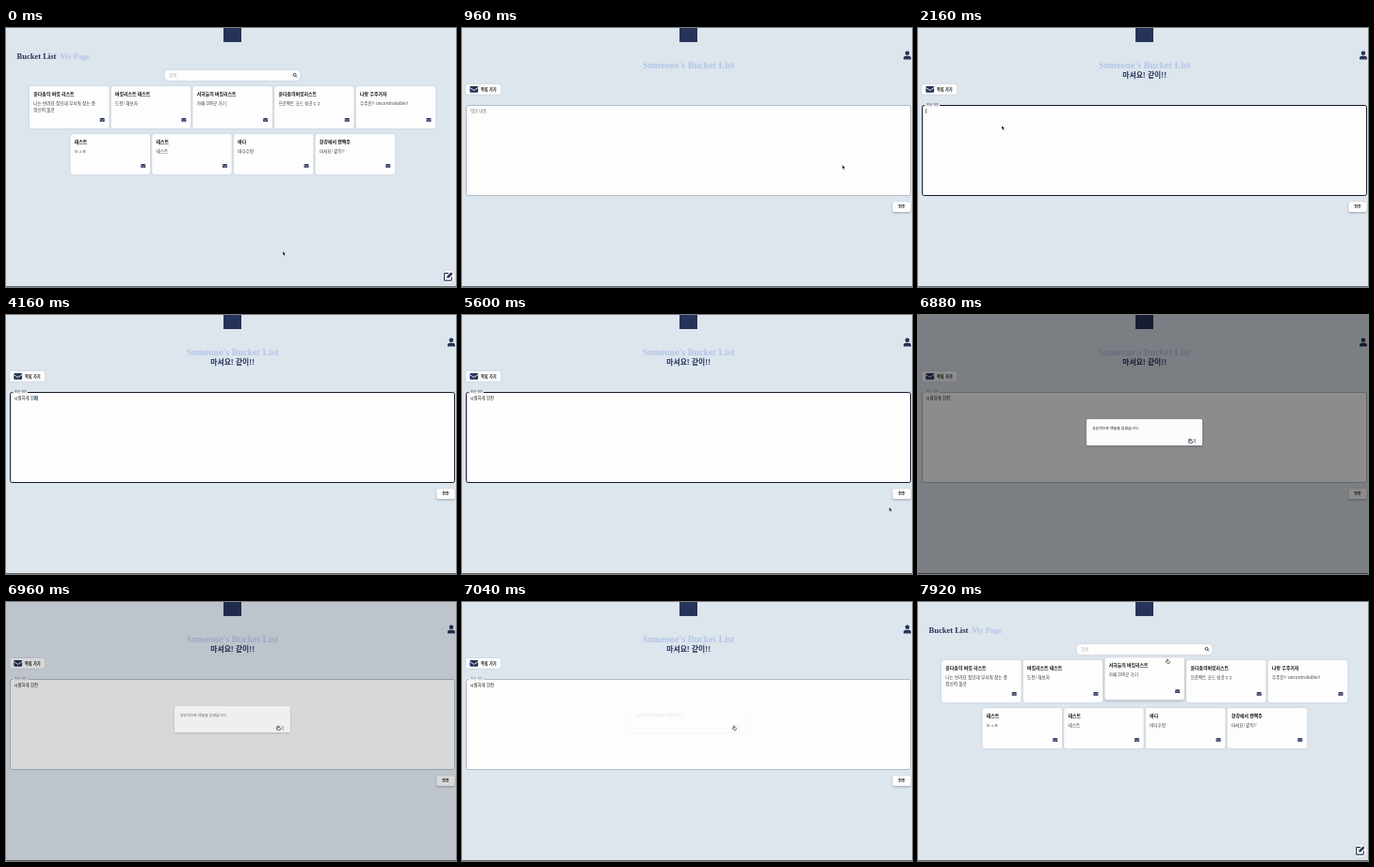
Write an HTML page that moves like this. It is 478 px wide and 276 px high and loops after 8 s.

```html
<!DOCTYPE html>
<html lang="ko">
<head>
<meta charset="utf-8">
<title>Bucket List</title>
<style>
html, body { margin: 0; width: 100%; height: 100%; overflow: hidden; background: #dde5ed; }
svg { display: block; width: 100%; height: 100%; }
text { font-family: "Noto Sans CJK KR", "Noto Sans CJK", "Noto Sans", sans-serif; white-space: pre; }
.serif { font-family: "Liberation Serif", serif; font-weight: 700; }
.bold { font-weight: 700; }
.soft { filter: drop-shadow(0 .5px .9px rgba(60, 80, 110, .15)); }
.raised { filter: drop-shadow(0 1px 1px rgba(30, 40, 60, .35)); }
</style>
</head>
<body>
<svg id="stage" viewBox="0 0 478 276"></svg>
<script>
const LOOP = 8000, NAVY = '#27345a', PALE = '#b3c5e8';
const stage = document.getElementById('stage');
const $ = id => document.getElementById(id);

const text = (x, y, size, str, fill = '#111', extra = '') =>
  `<text x="${x}" y="${y}" font-size="${size}" fill="${fill}" ${extra}>${str}</text>`;
const box = (x, y, w, h, r, fill, extra = '') =>
  `<rect x="${x}" y="${y}" width="${w}" height="${h}" rx="${r}" fill="${fill}" ${extra}/>`;
const mail = (x, y, w) => {
  const h = w * .76;
  return box(x, y, w, h, w * .12, NAVY) +
    `<path d="M${x} ${y + h * .24}l${w / 2} ${h * .42}l${w / 2} ${-h * .42}" fill="none" stroke="#fdfdfd" stroke-width="${w * .1}"/>`;
};

// title, description lines, hover interval
const cards = [
  ['윤다솜의 버킷 리스트', ['나는 반려묘 집인데 무서워 잡는 중', '정신력 풀로']],
  ['버킷리스트 테스트', ['도전! 해보자']],
  ['서하늘의 버킷리스트', ['카페 100곳 가기'], [7580, LOOP]],
  ['윤다솜의버킷리스트', ['프로젝트 코드 성공ㅎㅎ']],
  ['나랑 우주가자', ['우주인!! uncontrollable!!']],
  ['테스트', ['ㅌㅅㅌ']],
  ['테스트', ['테스트']],
  ['바다', ['바다수영'], [7150, 7480]],
  ['한강에서 캔맥주', ['마셔요! 같이!!'], [500, 960]]
];

function card([title, lines], i) {
  const low = i > 4, h = low ? 43 : 45, y = low ? 113 : 62;
  const x = low ? 68.5 + (i - 5) * 86.7 : 25 + i * 86.7;
  return `<g id="card${i}">` +
    box(x, y, 84.5, h, 3, '#fdfdfd') +
    text(x + 4.3, y + 10, 4.9, title, '#111', 'class="bold"') +
    lines.map((s, n) => text(x + 4.3, y + 19.7 + n * 7.6, 4.6, s, '#3c3c3c')).join('') +
    mail(x + 74.7, y + h - 11, 5) + '</g>';
}

const listPage = `<g id="list">
  ${text(11.5, 32.8, 8.5, 'Bucket List', NAVY, 'class="serif"')}
  ${text(57.3, 32.8, 8.5, 'My Page', PALE, 'class="serif"')}
  ${box(168.5, 45, 144, 11, 4.5, '#fdfdfd', 'class="soft"')}
  ${text(173, 52.2, 4.4, '검색', '#b0b0b0')}
  <g fill="none" stroke="#222" stroke-width=".8"><circle cx="306.6" cy="49.9" r="1.5"/><path d="M307.8 51.1l1.4 1.4"/></g>
  ${cards.map(card).join('')}
  <circle cx="470" cy="265" r="6.6" fill="#fdfdfd" class="soft"/>
  <g transform="translate(470 264.7) scale(1.12) translate(-470.2 -264.8)">
    <path d="M470.3 261.8h-3.3a.8.8 0 0 0-.8.8v5.4a.8.8 0 0 0 .8.8h5.4a.8.8 0 0 0 .8-.8v-2.8" fill="none" stroke="${NAVY}" stroke-width="1"/>
    <path d="M468.6 266.5l.4-2 3.7-3.7 1.6 1.6-3.7 3.7z" fill="${NAVY}"/>
  </g>
</g>`;

const formPage = `<g id="form">
  ${text(240.5, 42.8, 10.1, "Someone's Bucket List", PALE, 'class="serif" text-anchor="middle"')}
  ${text(240.7, 53.1, 7.8, '마셔요! 같이!!', NAVY, 'id="wish" class="bold" text-anchor="middle"')}
  <circle cx="473" cy="26.7" r="2.3" fill="${NAVY}"/>
  <path d="M469 33.4v-1a2.6 2.6 0 0 1 2.6-2.6h2.8a2.6 2.6 0 0 1 2.6 2.6v1z" fill="${NAVY}"/>
  ${box(4.3, 60, 36.7, 10.8, 1.8, '#fdfdfd', 'class="soft"')}
  ${mail(8.3, 62, 8.8)}
  ${text(20, 66.8, 4.2, '목록 가기', '#111', 'class="bold"')}
  ${box(4.5, 82.5, 472, 96, 2, '#fdfdfd', 'id="field"')}
  ${box(7.5, 81.4, 15.5, 2.2, 0, '#fdfdfd', 'id="notch"')}
  <text id="label" fill="#555">댓글 내용</text>
  <rect id="mark" y="86" height="5.2" fill="#a9cbe4"/>
  <text id="typed" x="8.5" y="90" font-size="4.4" fill="#111"></text>
  <rect id="caret" y="86" width=".6" height="5" fill="#111"/>
  ${box(457.3, 185.2, 19.4, 10.8, 1.8, '#fdfdfd', 'class="raised"')}
  ${text(467, 192.1, 4, '전송', '#111', 'class="bold" text-anchor="middle"')}
</g>`;

const dialog = `<rect id="shade" width="478" height="276" fill="#000"/>
<g id="dialog">
  ${box(179, 111, 123, 28, 1.5, '#fdfdfd', 'class="raised"')}
  ${text(185, 121.5, 3.9, '성공적으로 댓글을 남겼습니다.', '#111')}
  ${text(286.8, 135.8, 4.8, '닫기', NAVY)}
</g>`;

const pointer = `<g id="pointer" stroke="#fff" stroke-width=".4">
  <path id="arrow" d="M0 0v4.3l1-.9.8 1.8.8-.4-.8-1.7h1.4z" fill="#000"/>
  <path id="hand" transform="scale(.85)" d="M-.6.4a.6.6 0 0 1 1.2 0v1.7l1.8.4q.6.2.5.8l-.4 1.9h-2.9l-1.9-2.2q.4-.8 1.7.1z" fill="#fff" stroke="#111" stroke-width=".6"/>
</g>`;

stage.innerHTML = box(0, 0, 478, 276, 0, '#dde5ed') + box(231, -4, 19, 19, 0, NAVY) +
  listPage + formPage + box(0, 275, 478, 1, 0, '#666b70') + dialog + pointer;

const ease = (t, from, len) => {
  const x = Math.min(1, Math.max(0, (t - from) / len));
  return x * x * (3 - 2 * x);
};
const within = (t, a, b) => t >= a && t < b;
const show = (id, on) => $(id).setAttribute('visibility', on ? 'visible' : 'hidden');
const set = (id, attrs) => {
  for (const k in attrs) $(id).setAttribute(k, attrs[k]);
};

// time, x, y
const path = [
  [0, 294, 238], [80, 294, 238], [480, 372, 166], [760, 404, 146], [1240, 404, 146],
  [1520, 108, 100], [1680, 89, 104], [4920, 89, 104], [5280, 300, 200], [5480, 440, 221],
  [5700, 464, 193], [5900, 464, 193], [6320, 289, 132], [7240, 289, 132],
  [7540, 270, 110], [7880, 265, 61], [8000, 265, 61]
];
function pointerAt(t) {
  const i = path.findIndex(p => p[0] > t);
  const [t0, x0, y0] = path[i - 1], [t1, x1, y1] = path[i];
  const k = ease(t, t0, t1 - t0);
  return [x0 + (x1 - x0) * k, y0 + (y1 - y0) * k];
}

// Hangul composition: time, finished text, syllable in progress
const keys = [
  [2560, '', 'ㅅ'], [2680, '', '시'],
  [2880, '시', 'ㅇ'], [2960, '시', '우'], [3040, '시', '워'], [3120, '시', '원'],
  [3280, '시원', 'ㅎ'], [3360, '시원', '하'],
  [3520, '시원하', 'ㄱ'], [3680, '시원하', '게'],
  [3840, '시원하게 ', ''], [3920, '시원하게 ', 'ㅎ'], [4000, '시원하게 ', '하'], [4080, '시원하게 ', '한'],
  [4160, '시원하게 한', '자'], [4480, '시원하게 한', '잔'], [4640, '시원하게 한잔', '']
];

function drawForm(t) {
  const focus = within(t, 1720, 5700), up = ease(t, 1720, 200);
  show('wish', t >= 1040);
  set('field', { stroke: focus ? '#141a2b' : '#8798a8', 'stroke-width': focus ? 1 : .6 });
  set('notch', { opacity: up });
  set('label', { x: 9, y: 90 - 6.7 * up, 'font-size': 4.4 - 1.1 * up, fill: focus ? NAVY : '#777' });

  const [, done, part] = keys.filter(k => k[0] <= t).pop() || [0, '', ''];
  const typed = $('typed');
  typed.textContent = done + part;
  const end = done + part ? 8.5 + typed.getComputedTextLength() : 8.5;
  const wide = part ? 4.05 : 0;
  set('mark', { x: end - wide, width: wide });
  set('caret', { x: end });
  const typing = within(t, 2560, 4700);
  show('caret', focus && !part && (typing || (t - 1720) % 1060 < 530));
}

function draw(t) {
  const onForm = within(t, 960, 7140);
  $('list').style.display = onForm ? 'none' : '';
  $('form').style.display = onForm ? '' : 'none';
  if (onForm) drawForm(t);

  cards.forEach(([, , hover], i) => {
    const k = hover ? ease(t, hover[0], 220) - ease(t, hover[1], 220) : 0;
    const el = $('card' + i);
    el.setAttribute('transform', `translate(0 ${-2.7 * k})`);
    el.style.filter = `drop-shadow(0 ${.5 + .7 * k}px ${.9 + .5 * k}px rgba(50,65,95,${.15 + .2 * k}))`;
  });

  const enter = ease(t, 5765, 225);
  set('shade', { opacity: .5 * enter * (1 - ease(t, 6845, 180)) });
  set('dialog', { opacity: enter * (1 - ease(t, 6870, 220)) });

  const [x, y] = pointerAt(t);
  const hand = within(t, 500, 960) || within(t, 6260, 7480) || t >= 7580;
  set('pointer', { transform: `translate(${x} ${y})` });
  $('pointer').style.display = within(t, 2500, 4960) ? 'none' : '';
  $('arrow').style.display = hand ? 'none' : '';
  $('hand').style.display = hand ? '' : 'none';
}

const start = performance.now();
function tick() {
  draw((performance.now() - start) % LOOP);
  requestAnimationFrame(tick);
}
tick();
</script>
</body>
</html>
```
